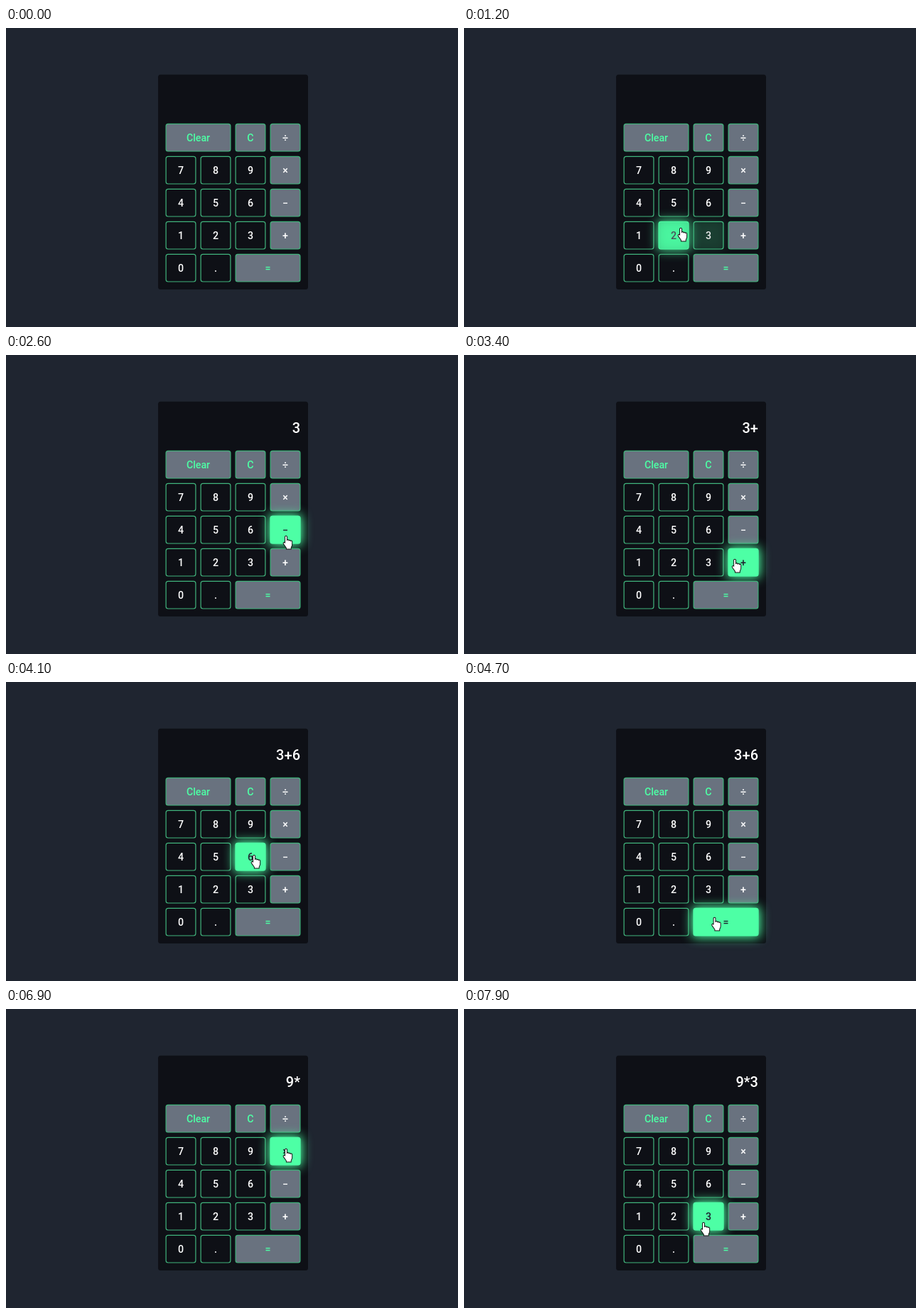
Recreate the animation shown at these times as an HTML page. Size 636 by 422 pixels, loop 8 s.

```html
<!DOCTYPE html>
<html lang="en">
<head>
<meta charset="utf-8">
<title>Calculator</title>
<style>
  html, body { margin: 0; width: 100%; height: 100%; overflow: hidden; background: #1f2530; }
  svg { display: block; width: 636px; height: 422px; }
  text { font: 500 14.2px Roboto, sans-serif; text-anchor: middle; }
  #display { font-size: 20px; text-anchor: end; fill: #fff; }
  .base { stroke: #40b47c; stroke-width: 1.2; }
  .glow { fill: #4dffa5; stroke: #4dffa5; stroke-width: 5; filter: url(#blur); }
  .lit { fill: #4dffa5; stroke: #4dffa5; stroke-width: 1.2; }
</style>
</head>
<body>
<svg viewBox="0 0 636 422">
  <defs>
    <filter id="blur" x="-80%" y="-80%" width="260%" height="260%" color-interpolation-filters="sRGB">
      <feGaussianBlur stdDeviation="7.5"/>
    </filter>
  </defs>
  <rect x="214" y="65.7" width="211" height="303.3" rx="3.5" fill="#0e1016"/>
  <text id="display" x="414" y="109.5"></text>
  <g id="keys"></g>
  <path id="hand" fill="#fff" stroke="#111" stroke-width="1.1" stroke-linejoin="round"
    d="M-1.6 1.6a1.6 1.6 0 0 1 3.2 0V6.6q0-1 1.3-1 1.5 0 1.5 1.6 .2-.9 1.3-.9 1.4 0 1.4 1.6 .2-.7 1.2-.7 1.3 0 1.3 1.7v4q0 2-1.1 3.6l-.5 1.2v2h-7.6v-1.7l-4-5.4q-1.3-1.7-.1-2.6 1.1-.8 2.1.4z"/>
</svg>
<script>
const LOOP = 8000, STEP = 100, FADE = 200, SAMPLES = 20;
const GREEN = '#4dffa5', DARK = '#1f2530', GRAY = '#69727f';
const PITCH_X = 49, PITCH_Y = 46, KEY_W = 43, KEY_H = 39.8;

const ENTRY = { x: 535, y: 154, leave: 600 };

// Key visited, arrival, departure, resting point relative to the key's centre
const visits = [
  ['=', 850, 850, -9, -6], ['2', 1120, 1200, 11, -10], ['3', 1400, 2200, 3, -3],
  ['−', 2400, 2650, 2, 9], ['+', 3000, 3200, -3, 7], ['6', 3900, 4100, 6, -2],
  ['=', 4600, 5300, -15, -6], ['+', 5950, 5950, -3, 4], ['×', 6450, 6900, 2, -3],
  ['3', 7600, LOOP, -6, 9]
];

// Display changes: time, text
const entries = [[0, ''], [2000, '3'], [3200, '3+'], [4000, '3+6'], [4900, '9'], [6900, '9*'], [7900, '9*3']];

const rows = [['Clear', '', 'C', '÷'], [...'789×'], [...'456−'], [...'123+'], ['0', '.', '=', '']];

function add(parent, tag, attrs) {
  const node = document.createElementNS('http://www.w3.org/2000/svg', tag);
  for (const name in attrs) node.setAttribute(name, attrs[name]);
  return parent.appendChild(node);
}

const keysGroup = document.getElementById('keys');

function makeKey(label, col, row) {
  // An empty neighbour is covered by a double-width key.
  const span = rows[row][col + 1] === '' ? 2 : 1;
  const x = 224.5 + PITCH_X * col, y = 134.8 + PITCH_Y * row;
  const w = KEY_W + PITCH_X * (span - 1), h = KEY_H;
  const box = { x: x + .6, y: y + .6, width: w - 1.2, height: h - 1.2, rx: 3 };
  const isGray = row === 0 || col === 3 || label === '=';
  const color = ['Clear', 'C', '='].includes(label) ? GREEN : '#ffffff';
  add(keysGroup, 'rect', { ...box, class: 'base', fill: isGray ? GRAY : 'none' });
  const glow = add(keysGroup, 'rect', { ...box, class: 'glow' });
  const lit = add(keysGroup, 'rect', { ...box, class: 'lit' });
  const text = add(keysGroup, 'text', { x: x + w / 2, y: y + h / 2 + 5.1 });
  text.textContent = label;
  return { label, x, y, w, h, color, glow, lit, text };
}

const keys = rows.flatMap((labels, row) =>
  labels.map((label, col) => label && makeKey(label, col, row)).filter(Boolean));

const stops = [ENTRY, ...visits.map(([label, arrive, leave, dx, dy]) => {
  const key = keys.find(k => k.label === label);
  return { arrive, leave, x: key.x + key.w / 2 + dx, y: key.y + key.h / 2 + dy };
})];

const smooth = p => p * p * (3 - 2 * p);

function cursorAt(t) {
  if (t < ENTRY.leave) return { x: -50, y: -50 };
  const i = stops.findIndex(stop => stop.leave > t);
  const from = stops[i - 1], to = stops[i];
  const p = smooth(Math.min(1, (t - from.leave) / (to.arrive - from.leave)));
  return { x: from.x + (to.x - from.x) * p, y: from.y + (to.y - from.y) * p };
}

const inside = (key, { x, y }) =>
  x >= key.x && x <= key.x + key.w && y >= key.y && y <= key.y + key.h;

const hand = document.getElementById('hand');
const display = document.getElementById('display');

function render(t) {
  const { x, y } = cursorAt(t);
  hand.setAttribute('transform', `translate(${x - 1} ${y - .5}) scale(.9 .95)`);
  display.textContent = entries.filter(entry => entry[0] <= t).pop()[1];

  // A key is lit by the share of the fade time the cursor spent on it.
  const trail = Array.from({ length: SAMPLES }, (_, i) => cursorAt(t - i * FADE / SAMPLES));
  for (const key of keys) {
    const level = trail.filter(point => inside(key, point)).length / SAMPLES;
    key.glow.style.opacity = level;
    key.lit.style.opacity = level;
    key.text.style.fill = `color-mix(in srgb, ${DARK} ${level * 100}%, ${key.color})`;
  }
}

const start = performance.now();
function tick() {
  const t = (performance.now() - start) % LOOP;
  render(Math.floor(t / STEP) * STEP);
  requestAnimationFrame(tick);
}
tick();
</script>
</body>
</html>
```
